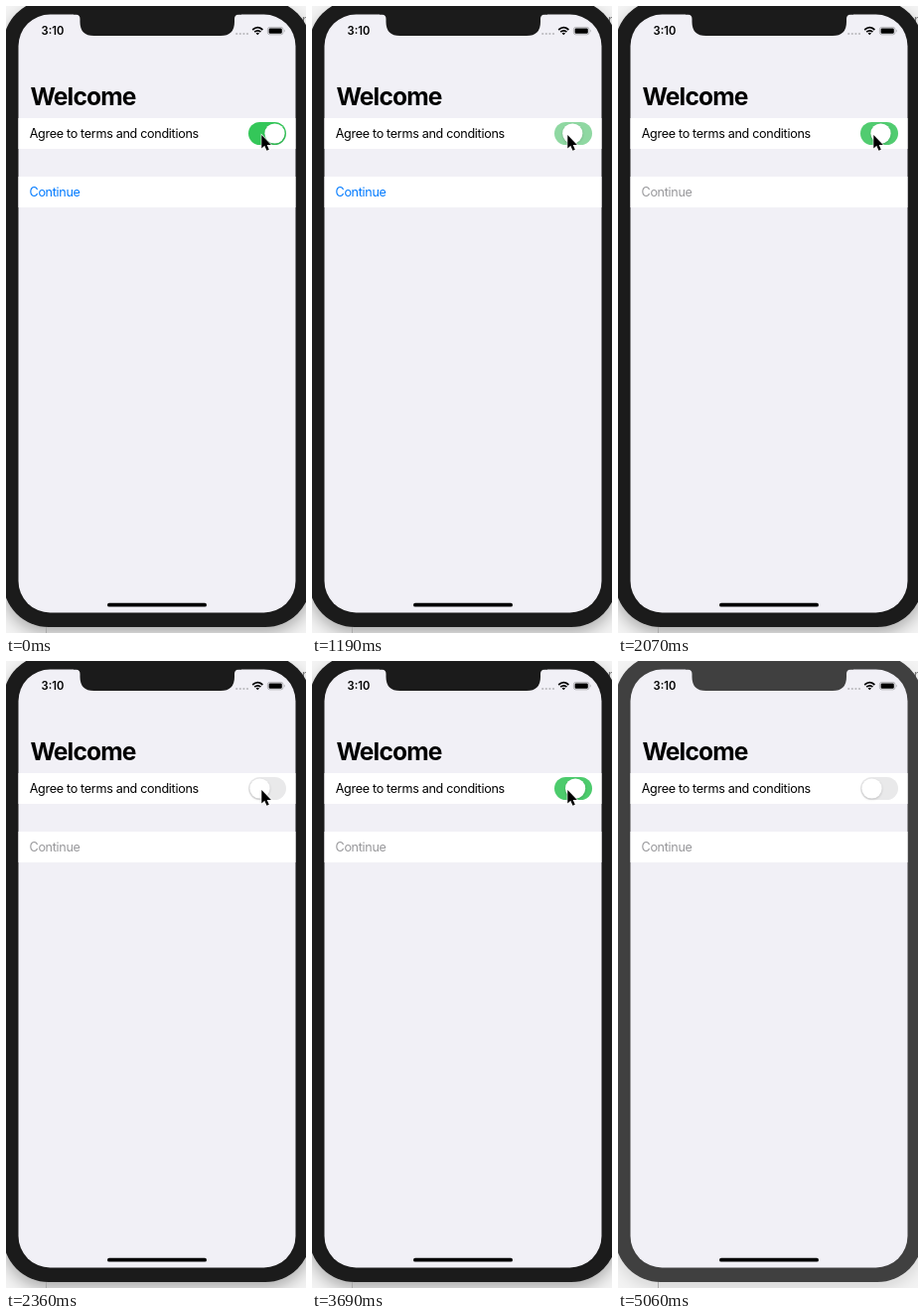
Animation of 302x632 px, one loop 5.16 s. Source, as an HTML page:

```html
<!DOCTYPE html>
<html lang="en">
<head>
<meta charset="utf-8">
<title>Terms toggle</title>
<style>
  html, body { margin: 0; width: 100%; height: 100%; overflow: hidden; background: #e9e9e9; }
  svg { display: block; width: 302px; height: 632px; font-family: Inter, "Liberation Sans", sans-serif; }
  .row { font-size: 12.6px; letter-spacing: -0.025em; }
  #knob { filter: drop-shadow(0 1px 1px rgba(0, 0, 0, .18)); }
</style>
</head>
<body>
<svg viewBox="0 0 302 632">
  <defs>
    <filter id="blur" x="-20%" y="-20%" width="140%" height="140%">
      <feGaussianBlur stdDeviation="8"/>
    </filter>
  </defs>

  <!-- desktop behind the phone -->
  <rect width="302" height="632" fill="#f3f3f3"/>
  <text x="298" y="18" font-size="12" fill="#777">n</text>
  <rect id="shadow" x="-3" y="2" width="310" height="630" rx="46" filter="url(#blur)"/>
  <path d="M40.5 620V632" stroke="#aaa"/>

  <!-- phone -->
  <rect class="bezel" x="-3" y="-6" width="310" height="632" rx="46"/>
  <rect x="12.5" y="8.5" width="279" height="603" rx="32" fill="#f1f0f6"/>
  <path class="bezel" d="M68 7V8.5H70Q74.5 8.5 74.5 13V16Q74.5 30 88.5 30H216Q230 30 230 16V13Q230 8.5 234.5 8.5H237V7Z"/>

  <!-- status bar -->
  <text x="35.6" y="29" font-size="11.2" font-weight="600">3:10</text>
  <g fill="#b9b9bd">
    <circle cx="232.2" cy="28" r="1.1"/><circle cx="235.8" cy="28" r="1.1"/>
    <circle cx="239.4" cy="28" r="1.1"/><circle cx="243" cy="28" r="1.1"/>
  </g>
  <g fill="none" stroke="#000" stroke-width="1.7">
    <path d="M248.2 24Q253.3 19.3 258.4 24"/>
    <path d="M250.2 26.2Q253.3 23.5 256.4 26.2"/>
  </g>
  <path d="M251.6 27.4Q253.3 26.1 255 27.4L253.3 29.2Z"/>
  <rect x="263.4" y="21.4" width="15.6" height="7.4" rx="2.2" fill="none" stroke="#a5a5a9" stroke-width=".8"/>
  <rect x="264.6" y="22.5" width="13.2" height="5.2" rx="1.2"/>
  <path d="M280 23.8Q281.6 25.1 280 26.4Z" fill="#a5a5a9"/>

  <!-- form -->
  <text x="24.4" y="100" font-size="24.6" font-weight="700" letter-spacing="-.86">Welcome</text>
  <path d="M12.5 113H291.5V144H12.5ZM12.5 172H291.5V203H12.5Z" fill="#fff"/>
  <text class="row" x="23.7" y="133">Agree to terms and conditions</text>
  <text class="row" id="button" x="23.5" y="192">Continue</text>
  <rect id="track" x="244" y="117" width="38" height="23" rx="11.5"/>
  <circle id="knob" cy="128.5" r="10.1" fill="#fff"/>
  <rect x="102" y="601.8" width="100" height="3.8" rx="1.9"/>

  <path id="cursor" d="M257.3 130V143.6L260.3 140.8L262.5 145.8L264.8 144.8L262.7 139.9H266.9Z"
        stroke="#fff" stroke-width="1.2" paint-order="stroke"/>
</svg>
<script>
  const LOOP = 5160;
  const CURSOR_MOVES = 4280, CURSOR_HIDES = 4430, WINDOW_DIMS = 5060;
  const OFF = [233, 233, 234], GREEN = [52, 199, 89];

  // [time, knob position, track tint, button enabled]
  const steps = [
    [0, 1, 1, true],
    [300, .55, .8, false], [440, 0, 0, false],
    [1040, .03, 0, true], [1190, .45, .5, true], [1340, .97, .92, true], [1480, 1, 1, true],
    [2070, .6, .84, false], [2210, .15, 0, false], [2360, 0, 0, false],
    [2810, 0, 0, true], [2960, .45, .5, true], [3100, .95, .92, true], [3250, 1, 1, true],
    [3690, .64, .87, false], [3840, .28, .02, false], [3990, 0, 0, false]
  ];

  const byId = id => document.getElementById(id);
  const button = byId('button'), track = byId('track'), knob = byId('knob');
  const cursor = byId('cursor'), shadow = byId('shadow');
  const bezels = document.querySelectorAll('.bezel');
  const mix = (a, b, k) => `rgb(${a.map((v, i) => Math.round(v + (b[i] - v) * k))})`;

  function draw(t) {
    const [, position, tint, enabled] = steps.findLast(step => step[0] <= t);
    knob.setAttribute('cx', 255.5 + 15 * position);
    track.setAttribute('fill', mix(OFF, GREEN, tint));
    button.setAttribute('fill', enabled ? '#007aff' : '#98989b');

    cursor.setAttribute('visibility', t < CURSOR_HIDES ? 'visible' : 'hidden');
    cursor.setAttribute('transform', t < CURSOR_MOVES ? '' : 'translate(24 386)');

    const dimmed = t >= WINDOW_DIMS;
    bezels.forEach(bezel => bezel.setAttribute('fill', dimmed ? '#404040' : '#1b1b1b'));
    shadow.setAttribute('opacity', dimmed ? .12 : .3);
  }

  const start = performance.now();
  function tick() {
    draw((performance.now() - start) % LOOP);
    requestAnimationFrame(tick);
  }
  tick();
</script>
</body>
</html>
```
